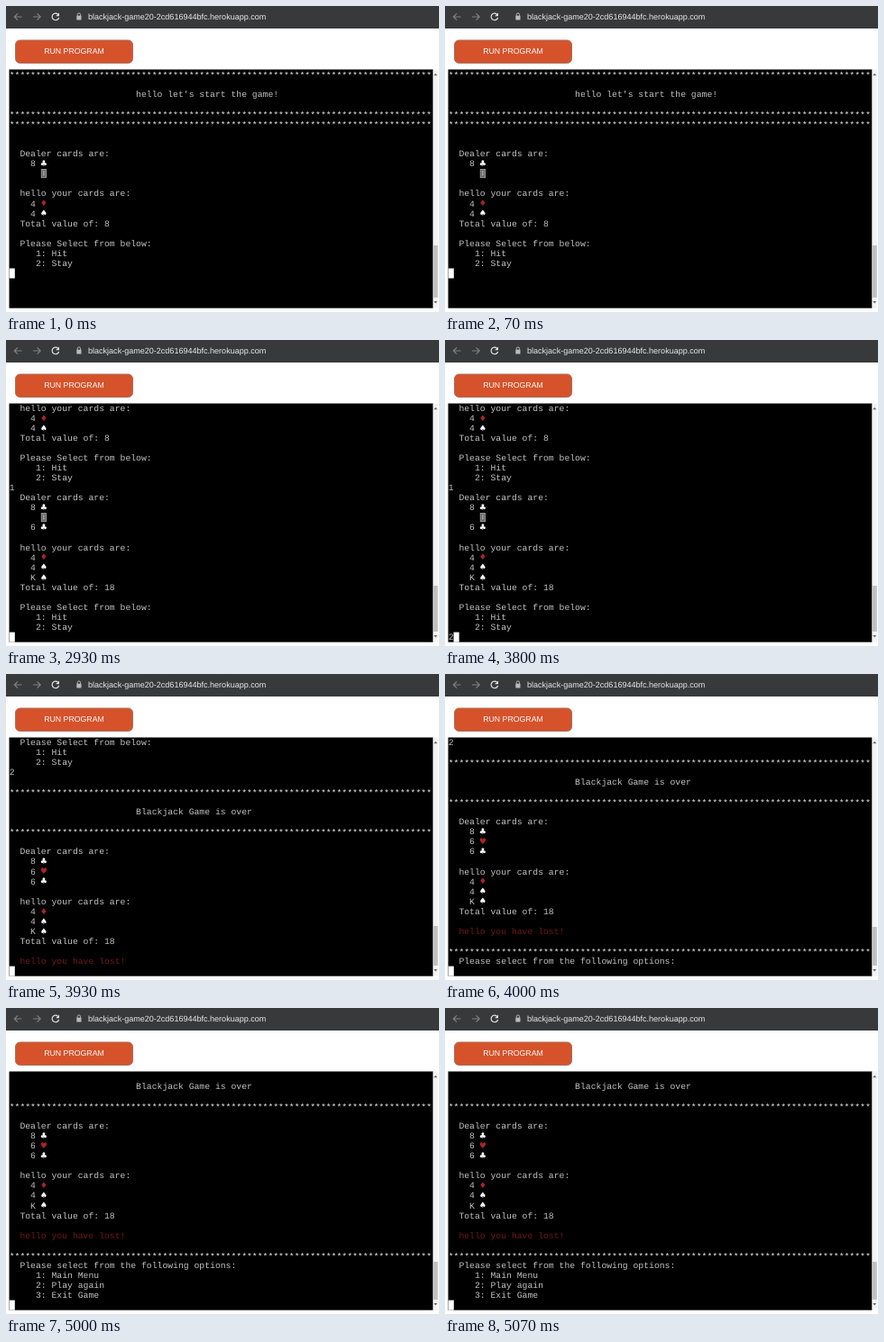
These frames come from a looping animation (480x340 px, 5390 ms). An HTML page:

```html
<!DOCTYPE html>
<html lang="en">
<head>
<meta charset="utf-8">
<title>Blackjack terminal</title>
<style>
  html, body { margin: 0; width: 100%; height: 100%; overflow: hidden; background: #fff; }
  svg { display: block; }
  text { white-space: pre; text-rendering: geometricPrecision; }
  .ui { font-family: "Liberation Sans", Arial, sans-serif; }
  .line { font: 9.765px "Liberation Mono", "Courier New", monospace; fill: #c2c2c2; }
  .stars { fill: #e4e4e4; }
  .lost { fill: #721719; }
  .suit { font: 9.2px "DejaVu Sans", sans-serif; fill: #fff; text-anchor: middle; }
  .red { fill: #ac2426; }
</style>
</head>
<body>
<svg width="480" height="340" viewBox="0 0 480 340">
  <defs><clipPath id="screen"><rect x="3.500" y="70.500" width="470" height="265.200"/></clipPath></defs>

  <!-- browser bar -->
  <rect width="480" height="25" fill="#38393b"/>
  <g fill="none" stroke-width="1.2">
    <path d="M17.500 12H9.500M13 8.300L9.300 12L13 15.700M30 12h8M34.500 8.300L38.200 12L34.500 15.700" stroke="#7f8083"/>
    <path d="M57.700 9.300A3.800 3.800 0 1 0 58.600 13" stroke="#e0e2e5"/>
    <path d="M79.200 11V9.600a1.700 1.700 0 0 1 3.400 0V11" stroke="#b8babd" stroke-width="1"/>
  </g>
  <path d="M59 7.500V11.300H55.200z" fill="#e0e2e5"/>
  <rect x="78.300" y="10.800" width="5.200" height="4.700" rx=".6" fill="#b8babd"/>
  <text class="ui" x="91" y="15.200" font-size="9.040" fill="#e8eaed">blackjack-game20-2cd616944bfc.herokuapp.com</text>

  <!-- button -->
  <rect x="10.500" y="38" width="130" height="25.500" rx="5" fill="#d5522b" stroke="#a9705c"/>
  <text class="ui" x="75.500" y="53.100" font-size="8.740" fill="#fff" text-anchor="middle">RUN PROGRAM</text>

  <!-- terminal -->
  <rect x="3.500" y="70.500" width="470" height="265.200" fill="#000"/>
  <g clip-path="url(#screen)"><g id="lines"></g></g>
  <rect id="cursor" width="6.100" height="11.050" fill="#fff"/>

  <!-- scrollbar -->
  <rect x="473.500" y="70.500" width="5.500" height="265.200" fill="#f4f4f4"/>
  <path d="M474.200 77.300L476.200 74.800L478.200 77.300zM474.200 328L476.200 330.500L478.200 328z" fill="#6a6a6a"/>
  <rect id="thumb" x="474" width="4.800" fill="#c1c1c1"/>
</svg>
<script>
const NS = "http://www.w3.org/2000/svg";
const LEFT = 3.7, TOP = 70.5, COL = 5.859, ROW = 11.05, LOOP = 5390;
const THUMB_END = 324;
const get = id => document.getElementById(id);

const stars = "*".repeat(80);
const title = s => " ".repeat(24) + s;
const card = s => "    " + s;
const dealer = (...cards) => ["  Dealer cards are:", ...cards.map(card), ""];
const player = (total, ...cards) =>
  ["  hello your cards are:", ...cards.map(card), "  Total value of: " + total, ""];
const choice = ["  Please Select from below:", "     1: Hit", "     2: Stay"];

// "#" stands for the face-down card
const buffer = [
  stars, "", title("hello let's start the game!"), "", stars, stars, "", "",
  ...dealer("8 ♣", "  #"), ...player(8, "4 ♦", "4 ♠"), ...choice, "1",
  ...dealer("8 ♣", "  #", "6 ♣"), ...player(18, "4 ♦", "4 ♠", "K ♠"), ...choice, "2",
  "", stars, "", title("Blackjack Game is over"), "", stars, "",
  ...dealer("8 ♣", "6 ♥", "6 ♣"), ...player(18, "4 ♦", "4 ♠", "K ♠"),
  "  hello you have lost!", "", stars,
  "  Please select from the following options:",
  "     1: Main Menu", "     2: Play again", "     3: Exit Game"
];

// start time, scrolled rows, rows printed, cursor column, thumb top
const steps = [
  [0, 0, 20, 0, 266],
  [2730, 0, 21, 1, 266],
  [2930, 12, 35, 0, 273],
  [3670, 12, 36, 1, 273],
  [3930, 32, 55, 0, 280],
  [4000, 35, 58, 0, 281],
  [4070, 38, 61, 0, 282]
];

function add(parent, tag, attrs, content = "") {
  const el = document.createElementNS(NS, tag);
  for (const key in attrs) el.setAttribute(key, attrs[key]);
  el.textContent = content;
  parent.appendChild(el);
  return el;
}

function makeRow(str, i) {
  const g = add(get("lines"), "g", { transform: `translate(${LEFT} ${TOP + i * ROW})` });
  const isStars = str === stars;
  const kind = isStars ? " stars" : str.includes("lost") ? " lost" : "";
  add(g, "text", { class: "line" + kind, x: 0, y: isStars ? 9.2 : 8.4 }, str.replace(/[♣♠♦♥#]/, ""));
  const suit = str.match(/[♣♠♦♥]/);
  if (suit) {
    const red = "♦♥".includes(suit[0]) ? " red" : "";
    add(g, "text", { class: "suit" + red, x: 6.5 * COL, y: 8.2 }, suit[0]);
  }
  if (str.includes("#")) {
    const x = 6 * COL;
    add(g, "rect", { x: x + 0.4, y: 0.5, width: 5.2, height: 9.2, fill: "#666", stroke: "#a0a0a0", "stroke-width": 0.9 });
    add(g, "path", { d: `M${x + 3} 2v6`, stroke: "#ddd", "stroke-width": 1.2, "stroke-dasharray": "1.2 .8" });
  }
  return g;
}

const rows = buffer.map(makeRow);
let current;

function show(step) {
  const [, scroll, printed, col, thumb] = step;
  rows.forEach((g, i) => g.setAttribute("visibility", i < printed ? "visible" : "hidden"));
  get("lines").setAttribute("transform", `translate(0 ${-scroll * ROW})`);
  const row = printed - scroll - (col ? 1 : 0);
  get("cursor").setAttribute("x", LEFT + col * COL);
  get("cursor").setAttribute("y", TOP + row * ROW);
  get("thumb").setAttribute("y", thumb);
  get("thumb").setAttribute("height", THUMB_END - thumb);
}

const start = performance.now();
function tick() {
  const t = (performance.now() - start) % LOOP;
  const step = steps.findLast(s => s[0] <= t);
  if (step !== current) show(current = step);
  requestAnimationFrame(tick);
}
tick();
</script>
</body>
</html>
```
